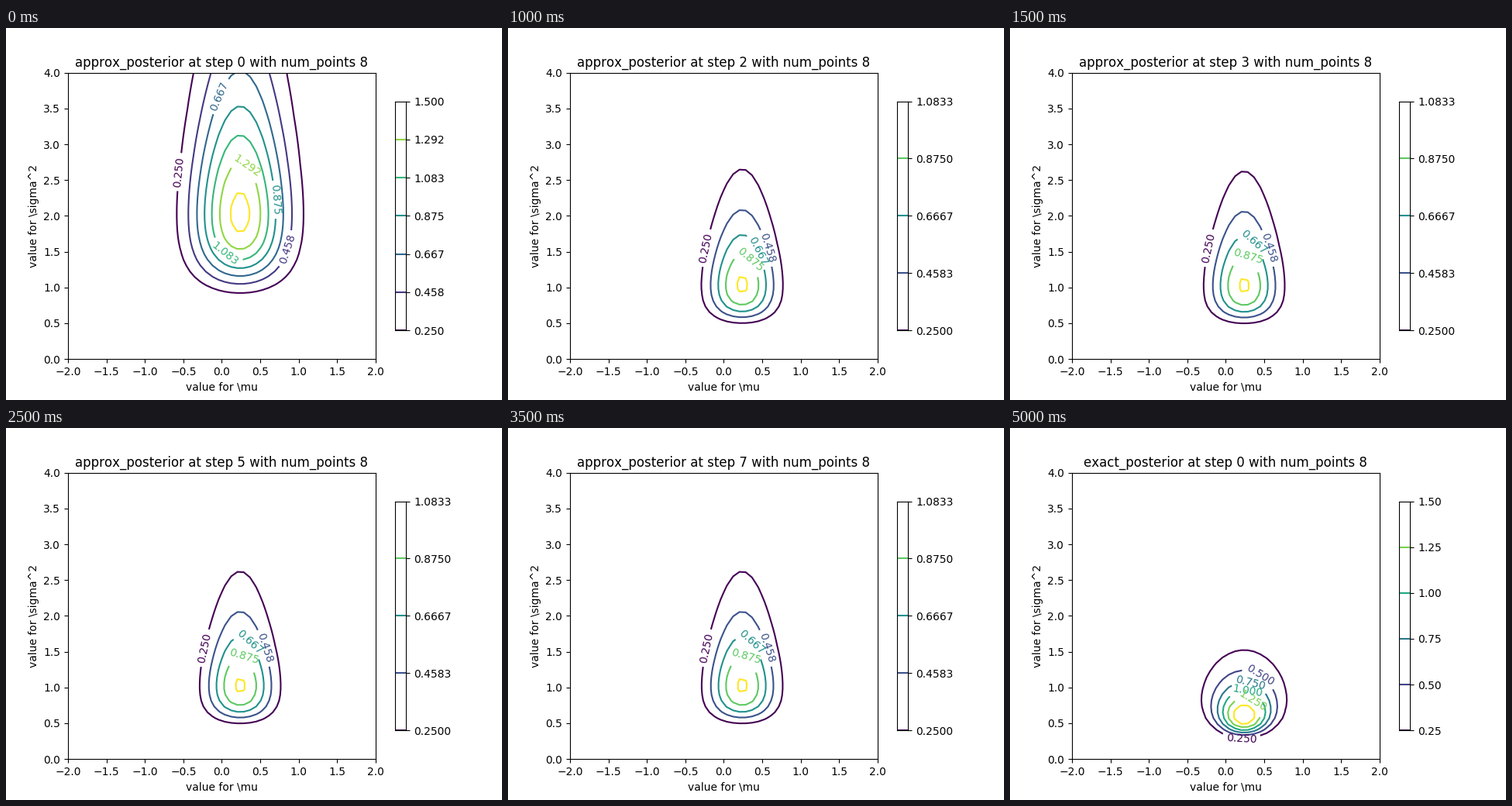
Animation, 640 px wide and 480 px high, one loop 5.5 s. Source, as a matplotlib script:

```python
from math import ceil, gamma

import numpy as np
import matplotlib.pyplot as plt
from matplotlib.animation import FuncAnimation

plt.rcParams["text.kerning_factor"] = 6

STEPS = 10
N = 8
MU = 0.239        # posterior mean
LAM = N + 1       # precision scale of the mean
LABEL_WIDTH = 5 * 0.6 * 10 * 100 / 72   # five characters at 10 pt, in pixels
GRID_MU, GRID_VAR = np.meshgrid(np.linspace(-2, 2, 50), np.linspace(0, 4, 50))


def approx_posterior(mu, var, step):
    """Factorised q(mu) q(tau); the rate converges geometrically."""
    a, b = 5.5, 4.6 + 4.52 * 0.1 ** step
    lam = LAM * a / b
    tau = 1 / np.maximum(var, 1e-3)
    q_mu = np.sqrt(lam / (2 * np.pi)) * np.exp(-lam * (mu - MU) ** 2 / 2)
    q_tau = b ** a / gamma(a) * tau ** (a - 1) * np.exp(-b * tau)
    return q_mu * q_tau


def exact_posterior(mu, var):
    """Normal-inverse-gamma density."""
    a, b = 4.5, 3.61
    tau = 1 / np.maximum(var, 1e-3)
    norm = np.sqrt(LAM / (2 * np.pi)) * b ** a / gamma(a)
    rate = b + LAM * (mu - MU) ** 2 / 2
    return norm * tau ** (a + 1.5) * np.exp(-rate * tau)


def label_spot(points, taken):
    """Vertex amid the straightest stretch that is clear of other labels."""
    n = len(points)
    rows = ceil(n / LABEL_WIDTH)
    size = n if rows == 1 else int(LABEL_WIDTH)
    blocks = np.resize(points, (rows, size, 2))
    chord = blocks[:, -1:] - blocks[:, :1]
    offset = blocks - blocks[:, :1]
    cross = offset[..., 0] * chord[..., 1] - offset[..., 1] * chord[..., 0]
    length = np.hypot(chord[..., 0], chord[..., 1]) + 1e-9
    order = np.argsort((np.abs(cross) / length).sum(axis=1))
    spots = [(row * size + size // 2) % n for row in order]
    for k in spots:
        if all(np.hypot(*(points[k] - p)) >= 1.2 * LABEL_WIDTH for p in taken):
            return k
    return spots[0]


def label_contours(ax, contours):
    """Label every contour but the innermost."""
    taken, spots = [], []
    for segments in contours.allsegs[:-1]:
        points = ax.transData.transform(segments[0])
        k = label_spot(points, taken)
        taken.append(points[k])
        spots.append(tuple(segments[0][k]))
    ax.clabel(contours, inline=True, fontsize=10, fmt="%1.3f", manual=spots)


def draw_colorbar(levels, colors):
    cax = fig.add_axes([0.78375, 0.187, 0.0231, 0.616])
    cax.hlines(levels, 0, 1, colors=colors, linewidth=1.5)
    cax.yaxis.tick_right()
    cax.set(xlim=(0, 1), ylim=(levels[0], levels[-1]), xticks=[],
            yticks=levels)


def draw(i):
    fig.clear()
    ax = fig.add_axes([0.125, 0.11, 0.62, 0.77])
    if i < STEPS:
        name, step, count = "approx_posterior", i, 7
        z = approx_posterior(GRID_MU, GRID_VAR, step)
    else:
        name, step, count = "exact_posterior", 0, 6
        z = exact_posterior(GRID_MU, GRID_VAR)
    levels = np.linspace(0.25, 1.5, count)
    levels = levels[levels < z.max()]
    colors = plt.cm.viridis(np.linspace(0, 1, len(levels)))

    contours = ax.contour(GRID_MU, GRID_VAR, z, levels=levels, colors=colors,
                          linewidths=1.5, algorithm="mpl2014")
    ax.set(xlim=(-2, 2), ylim=(0, 4),
           xlabel=r"value for \mu", ylabel=r"value for \sigma^2",
           title=f"{name} at step {step} with num_points {N}")
    label_contours(ax, contours)
    draw_colorbar(levels, colors)
    return []


fig = plt.figure(figsize=(6.4, 4.8), dpi=100)
anim = FuncAnimation(fig, draw, frames=STEPS + 1, interval=500,
                     init_func=lambda: [], repeat=True, repeat_delay=0)
plt.show()
```
